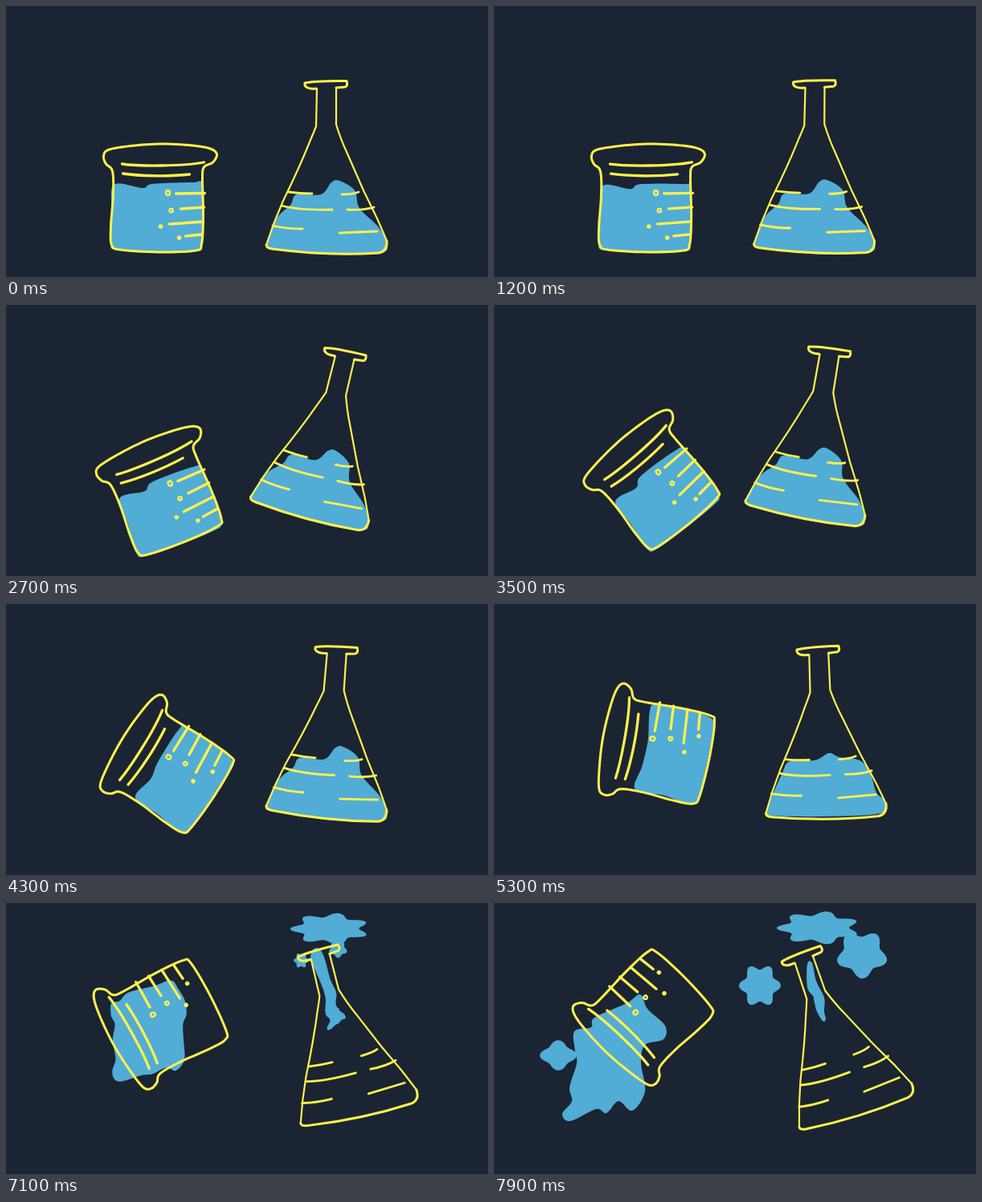
These frames come from a looping animation (600 px wide and 338 px high, 8 s). An HTML page with a canvas:

```html
<!DOCTYPE html>
<html lang="en">
<head>
<meta charset="utf-8">
<title>Beaker and flask</title>
<style>
html, body { margin: 0; width: 100%; height: 100%; overflow: hidden; background: #1b2432; }
canvas { display: block; }
</style>
</head>
<body>
<canvas id="stage" width="600" height="338"></canvas>
<script>
const ctx = document.getElementById('stage').getContext('2d');
const LOOP = 8, FPS = 10, SAMPLES = 140;
const BG = '#1b2432', BLUE = '#51acd6', YELLOW = '#fff04d';

const mix = (a, b, u) => a + (b - a) * u;
const clamp = u => Math.min(1, Math.max(0, u));
// Zero before s = 0, then rising at unit speed, with a soft start.
const ramp = s => .15 * Math.log1p(Math.exp(s / .15));

// Closed spline through "x,y x,y ...", evenly sampled so that any two can blend.
function outline(text) {
  const pts = text.trim().split(/\s+/).map(p => p.split(',').map(Number)), n = pts.length;
  return Array.from({ length: SAMPLES }, (_, k) => {
    const u = k / SAMPLES * n, i = Math.floor(u), f = u - i;
    const [a, b, c, d] = [-1, 0, 1, 2].map(o => pts[(i + o + n) % n]);
    return [0, 1].map(j => b[j] + f / 2 * (c[j] - a[j] +
      f * (2 * a[j] - 5 * b[j] + 4 * c[j] - d[j] + f * (3 * (b[j] - c[j]) + d[j] - a[j]))));
  });
}

function polygon(pts) {
  const path = new Path2D();
  pts.forEach(p => path.lineTo(...p));
  path.closePath();
  return path;
}

const place = (x, y, angle, cx, cy) =>
  new DOMMatrix().translate(x, y).rotate(angle).translate(-cx, -cy);

// The beaker turns steadily while its centre swings up along an arc.
function beakerPose(t) {
  const turn = ramp(t - 1.65), swing = turn * 27 * Math.PI / 180;
  return place(189 + 16 * Math.sin(swing), 190 + 53 * Math.cos(swing), -21.7 * turn, 188.5, 243);
}

// The flask lifts and tips right, then leans slowly back to the left.
function flaskPose(t) {
  const lift = ramp(t - 1.47), lean = ramp(t - 2.57);
  const y = 200 - 37.5 * (lift - lean) + .13 * lean ** 2;
  return place(398.5 + 3.6 * lean, y, 13.6 * lift - 20.05 * lean, 398.5, 200);
}

// Liquid outlines are given on the stage at a time and blended in the vessel's own space.
// A null outline holds the one before it.
function liquid(pose, keys) {
  let pts;
  const shapes = keys.map(([time, text]) => {
    const inv = pose(time).inverse();
    if (text) pts = outline(text).map(([x, y]) => {
      const p = inv.transformPoint({ x, y });
      return [p.x, p.y];
    });
    return { time, pts };
  });
  return t => {
    if (t < shapes[0].time) return;
    const i = shapes.findLastIndex(s => s.time <= t);
    const a = shapes[i], b = shapes[i + 1];
    if (!b && a.fades) return;
    const u = b ? (t - a.time) / (b.time - a.time) : 0;
    ctx.setTransform(pose(t));
    ctx.fill(polygon(a.pts.map((p, k) => p.map((v, j) => b ? mix(v, b.pts[k][j], u) : v))));
  };
}

// A lumpy puff that leaves a spout and swells as it flies.
function puff(start, end, spout, centre, size, lumps, phase) {
  return t => {
    if (t <= start) return;
    const u = 1 - (1 - clamp((t - start) / (end - start))) ** 2;
    ctx.resetTransform();
    ctx.fill(polygon(Array.from({ length: SAMPLES }, (_, k) => {
      const a = k / SAMPLES * 2 * Math.PI, r = u * (.9 + .14 * Math.sin(lumps * a + phase));
      return [Math.cos(a), Math.sin(a)].map((v, j) => mix(spout[j], centre[j], u) + v * r * size[j]);
    })));
  };
}

const mouth = [388, 54];
const liquids = [
  liquid(beakerPose, [
    [0, '134,223 170,227 182,222 232,220 244,222 245,265 243,300 233,306 188,307 138,304 130,296 132,260'],
    [3.5, '151,245 177,228 183,213 228,180 239,181 265,213 280,238 274,249 240,277 203,304 190,304 170,273'],
    [6.4, '193,215 189,185 185,140 171,122 172,108 205,98 243,95 251,107 262,150 269,188 262,202 230,206'],
    [7.9, `95,272 85,263 97,247 94,230 103,200 101,185 100,160 121,155 125,143 165,125 182,114 191,132
      213,153 211,170 188,177 183,200 188,235 172,259 155,247 140,262 127,257`]
  ]),
  liquid(flaskPose, [
    [0, '325,297 337,265 354,248 362,235 392,235 405,220 415,218 434,230 440,252 464,276 474,296 466,308 400,310 332,303'],
    [4.3, null],
    [5.3, '340,260 346,240 358,213 368,196 399,195 417,186 430,191 455,195 468,210 476,235 487,246 482,261 413,265 348,264'],
    [6.4, `376,247 382,233 402,210 396,190 395,165 408,157 418,140 430,158 444,170 444,192 456,205 456,217
      476,232 478,249 455,245 445,241 424,252 415,246 393,257 397,249 385,251`],
    [7.3, '404,132 399,120 401,112 407,122']
  ]),
  liquid(flaskPose, [
    [5.7, '405,192 401,188 404,185 408,189'],
    [6.4, '403,143 393,139 397,115 391,90 382,60 373,48 381,41 391,46 400,64 405,90 412,105 411,118 416,130 412,140'],
    [7.9, '409,147 401,133 398,118 390,105 390,76 396,75 401,97 411,118 411,135 413,145']
  ]),
  puff(6.4, 7.3, mouth, [404, 31], [50, 20], 7, 4.8),
  puff(6.9, 7.9, mouth, [458, 64], [31, 29], 5, .1),
  puff(6.9, 7.9, mouth, [331, 103], [25, 26], 6, 1.6),
  puff(7.2, 7.9, [106, 185], [80, 190], [22, 18], 4, 1.6)
];

const beakerOutline = polygon(outline(`121,187 128,179 160,174 195,172 232,174 254,178 262,185 257,195 246,201
  244,215 245,260 243,297 235,305 190,307 142,304 131,298 130,275 133,235 132,206 124,197`));
const beakerMarks = new Path2D(`M144 197C165 200 220 200 246 195M145 209C165 212 200 213 228 210
  M211 234L247 233.5M217 253L246 251M203 272L245 269M223 287L243 285`);
const rings = new Path2D('M198.5 233a2.5 3 0 1 0 5 0a2.5 3 0 1 0-5 0M203 255a2.2 2.3 0 1 0 4.4 0a2.2 2.3 0 1 0-4.4 0');
const dots = new Path2D('M192 275h.01M215 289h.01');

const flaskSides = new Path2D(`M387 103L386 150Q383 158 379 167Q366 200 345 243Q333 270 324 298
  M411 102L411 148Q417 167 424 182L445 230L462 265Q469 281 474 293`);
const flaskEnds = new Path2D(`M386 103C376 104 371 101 372 96Q385 93 424 93.5Q426 100 422 101L411 102
  M324 298Q324 302 332 303Q400 312 464 308Q475 306 474 293`);
const flaskMarks = new Path2D(`M352 232Q366 234 381 234M343 249Q365 255 406 254M332 274Q350 278 369 278
  M418 235Q432 235 439 232M425 254Q445 255 458 251M415 283Q440 282 462 281`);

const line = (path, width) => { ctx.lineWidth = width; ctx.stroke(path); };

function draw(t) {
  ctx.resetTransform();
  ctx.fillStyle = BG;
  ctx.fillRect(0, 0, 600, 338);
  ctx.fillStyle = BLUE;
  liquids.forEach(paint => paint(t));

  ctx.strokeStyle = YELLOW;
  ctx.lineCap = ctx.lineJoin = 'round';
  ctx.setTransform(beakerPose(t));
  line(beakerOutline, 3);
  line(beakerMarks, 3.3);
  line(rings, 2.4);
  line(dots, 5.5);
  ctx.setTransform(flaskPose(t));
  line(flaskSides, 2.2);
  line(flaskEnds, 3);
  line(flaskMarks, 2.8);
}

function tick(now) {
  draw(Math.floor(now / 1000 % LOOP * FPS) / FPS);
  requestAnimationFrame(tick);
}
requestAnimationFrame(tick);
</script>
</body>
</html>
```
